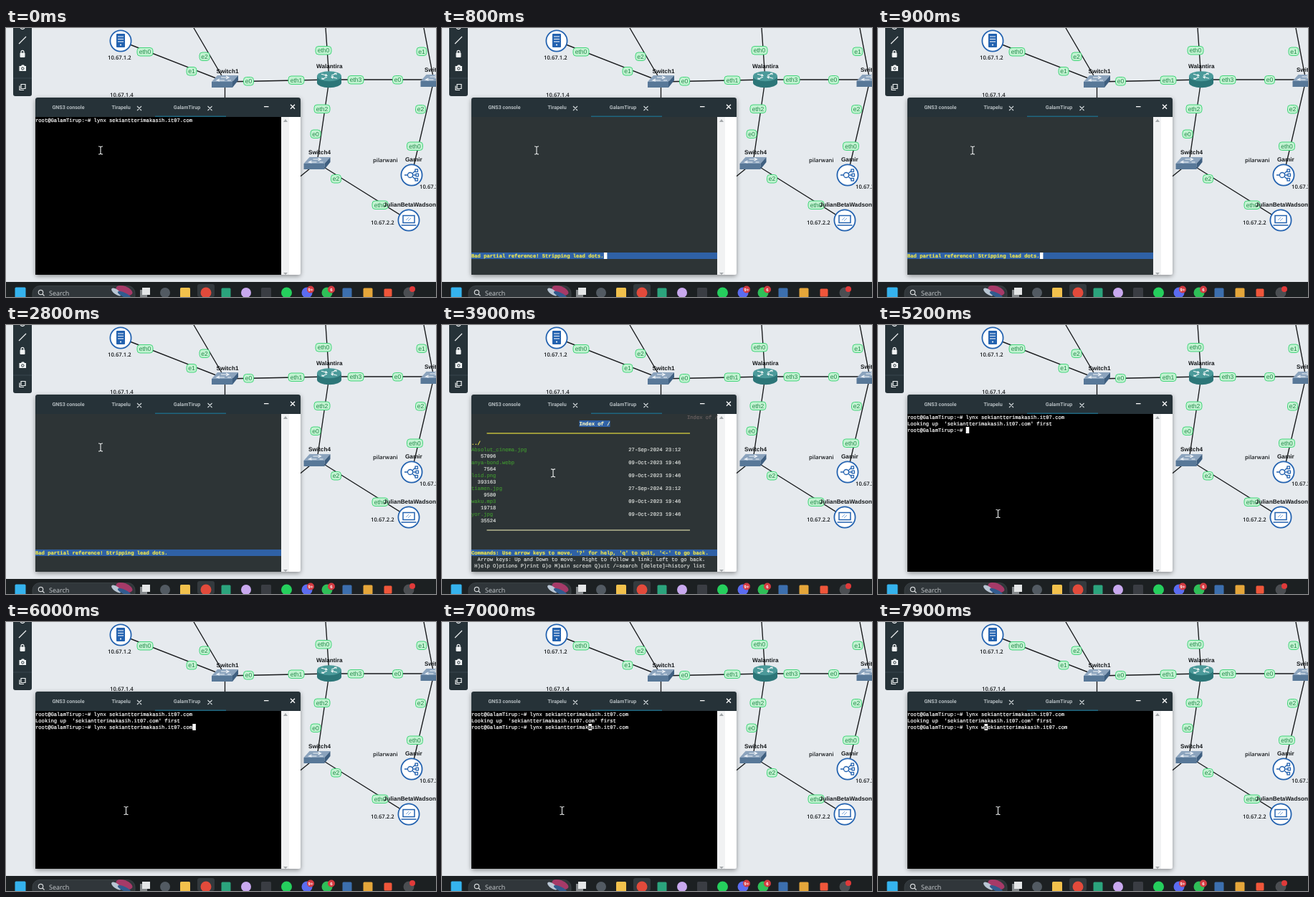
Write an HTML page that moves like this. It is 600 px wide and 375 px high and loops after 8 s.

```html
<!DOCTYPE html>
<html lang="en">
<head>
<meta charset="utf-8">
<title>Network console</title>
<style>
  html, body { margin: 0; width: 100%; height: 100%; overflow: hidden; background: #e6eaee; }
  svg { display: block; width: 600px; height: 375px; }
  text { text-rendering: geometricPrecision; white-space: pre; }
  .node { font: bold 8.2px "Liberation Sans", Arial, sans-serif; fill: #15181b; }
  .note { font: 600 7.7px "Open Sans", "Noto Sans", sans-serif; fill: #15181b; }
  .port { font: 8.6px "Liberation Sans", Arial, sans-serif; fill: #258a4c; text-anchor: middle; }
  .tab { font: 700 7.1px Roboto, sans-serif; fill: #b4bcc0; text-anchor: middle; }
  .ui { font: 9px "Open Sans", "Noto Sans", sans-serif; fill: #c9cdd0; }
  .badge { font: bold 6px "Liberation Sans", sans-serif; fill: #fff; text-anchor: middle; }
  #term text { font: 7.167px "Liberation Mono", "Courier New", monospace; stroke-width: .2px; }
  #term .b { font-weight: bold; }
</style>
</head>
<body>
<svg viewBox="0 0 600 375">
  <defs>
    <filter id="shadow" x="-10%" y="-10%" width="120%" height="125%">
      <feDropShadow dx="0" dy="2" stdDeviation="3" flood-opacity=".4"/>
    </filter>
    <g id="switch">
      <path d="M-18 0L-10-9H19L11 0Z" fill="#8ba3bd"/>
      <path d="M-18 0H11V8H-18Z" fill="#587898"/>
      <path d="M11 0L19-9V-2L11 8Z" fill="#3f5f80"/>
      <path d="M-5-6H5M2-8L6-6L2-4M-10-2H0M-7-4L-11-2L-7-1M4-2H9" fill="none" stroke="#eef3f8" stroke-width="1.1"/>
    </g>
    <g id="router">
      <path d="M-17-5V4A17 7 0 0 0 17 4V-5Z" fill="#2c7678"/>
      <ellipse cy="-5" rx="17" ry="7" fill="#4b9a9a"/>
      <path d="M-11-8L-3-6M-6-5L-3-6L-5-8M11-2L3-4M6-5L3-4L5-2M3-6L10-9M7-9H10V-7M-3-4L-10-1M-7-1H-10V-3" fill="none" stroke="#f1f8f8" stroke-width="1.1"/>
    </g>
    <circle id="disc" r="14.6" fill="#fff" stroke="#2463b0" stroke-width="1.8"/>
  </defs>

  <rect width="600" height="375" fill="#e6eaee"/>
  <path stroke="#17191b" stroke-width="1.35" fill="none" d="M160 18L306 75M262 0L306 75M305.500 75V100M306 75L451 72M446 0L451 72L597 72M451 72L434 188L562 268M434 188L400 215.500M583 0L597 73L566 205"/>
  <use href="#switch" x="305" y="75"/>
  <use href="#switch" x="433.500" y="189"/>
  <use href="#switch" x="596.500" y="74"/>
  <use href="#router" x="451" y="72.300"/>

  <use href="#disc" x="160" y="18"/>
  <rect x="154" y="8" width="12" height="19" rx="1" fill="#2463b0"/>
  <path d="M156 12H164M156 15.500H164M156 19H164" stroke="#fff" stroke-width="1.1"/>
  <circle cx="160" cy="23.500" r="1.100" fill="#fff"/>

  <use href="#disc" x="566" y="205"/>
  <g fill="#fff" stroke="#2463b0" stroke-width="1.3">
    <path d="M556 205H572M571 199L565 205L571 211" fill="none"/>
    <circle cx="564" cy="205" r="3.500"/>
    <rect x="571" y="197" width="3.500" height="3.500"/>
    <rect x="572" y="203.200" width="3.500" height="3.500"/>
    <rect x="571" y="209.500" width="3.500" height="3.500"/>
  </g>
  <use href="#disc" x="562" y="268"/>
  <path d="M554 261.500H570V271.500H554ZM551.500 275H572.500" fill="#fff" stroke="#2463b0" stroke-width="1.5"/>
  <path d="M558 268L562 264M561 269L565 265" stroke="#7fa8da"/>
  <g id="ports"></g>
  <g id="labels"></g>

  <path d="M10 0H36V92Q36 95 33 95H13Q10 95 10 92Z" fill="#263238"/>
  <g fill="none" stroke="#f0f3f4" stroke-width="1.2">
    <path d="M20 0Q23 3 26 0M18 22L28 12M21 35V33.500A2 2.200 0 0 1 25 33.500V35"/>
    <path d="M10 70H36" stroke="#36444b"/>
    <path d="M21 78.500H27V84.500H21ZM19 80.500V86.500H25"/>
  </g>
  <rect x="19.500" y="34.500" width="7" height="6.500" rx="1" fill="#f0f3f4"/>
  <path d="M18.500 53H21L22 51.500H25L26 53H28V60H18.500Z" fill="#f0f3f4"/>
  <circle cx="23.300" cy="56.500" r="1.700" fill="#f0f3f4" stroke="#263238"/>

  <rect x="41" y="97" width="370" height="247" rx="3" fill="#fff" filter="url(#shadow)"/>
  <path d="M41 124V100Q41 97 44 97H408Q411 97 411 100V124Z" fill="#263238"/>
  <rect x="208" y="122.500" width="99" height="1.500" fill="#1f6680"/>
  <text class="tab" x="87" y="112.500">GNS3 console</text>
  <text class="tab" x="160.500" y="112.500">Tirapelu</text>
  <text class="tab" x="252.500" y="112.500">GalamTirup</text>
  <g stroke="#d3d9dc" stroke-width="1.1">
    <path d="M183 109L189 115M189 109L183 115M281.500 109L287.500 115M287.500 109L281.500 115"/>
    <path d="M360 109.700H366.500M397 106.700L403 112.700M403 106.700L397 112.700" stroke="#fff" stroke-width="1.3"/>
  </g>
  <rect x="384" y="124" width="11" height="220" fill="#f1f2f3"/>
  <path d="M387 131L390 127L393 131ZM387 341L390 344L393 341Z" fill="#a3a7aa"/>
  <g id="term"></g>
  <path id="mouse" d="M-3-5.500Q0-5.500 0-4Q0-5.500 3-5.500M0-4V4M-3 5.500Q0 5.500 0 4Q0 5.500 3 5.500" fill="none" stroke="#eceeee" stroke-width="1.1"/>

  <rect y="354" width="600" height="21" fill="#1c2022"/>
  <rect x="37" y="359.500" width="143" height="24" rx="10" fill="#30363a" stroke="#41474b" stroke-width=".8"/>
  <circle cx="48.500" cy="368.500" r="3.200" fill="none" stroke="#d5d8da" stroke-width="1.2"/>
  <path d="M51 371L53.500 373.500" stroke="#d5d8da" stroke-width="1.2"/>
  <text class="ui" x="60" y="373">Search</text>
  <ellipse cx="165" cy="366" rx="12" ry="6" fill="#a63a68" transform="rotate(20 165 366)"/>
  <ellipse cx="154" cy="368" rx="8" ry="3.500" fill="#b9c6d4" transform="rotate(35 154 368)"/>
  <ellipse cx="165" cy="372" rx="10" ry="3" fill="#315b8e" transform="rotate(25 165 372)"/>
  <g id="icons"></g>
</svg>
<script>
const el = id => document.getElementById(id);

// Diagram labels
const ports = [
  ["eth0", 194, 33], ["e1", 259, 60], ["e2", 277, 39.5], ["e0", 338.5, 74], ["eth1", 405, 72.5],
  ["eth3", 488, 72], ["e0", 546.5, 72], ["eth0", 443, 31], ["eth2", 441, 112.5], ["e0", 432, 147.5],
  ["e1", 580, 32.5], ["e2", 578.5, 113], ["eth0", 570.5, 164.5], ["e2", 460.5, 210], ["eth0", 522, 246.5]];
el("ports").innerHTML = ports.map(([s, x, y]) => {
  const w = s.length > 2 ? 22 : 14;
  return `<rect x="${x - w / 2}" y="${y - 5.5}" width="${w}" height="11.500" rx="4" fill="#c3f3d2" stroke="#45d57c"/>
    <text class="port" x="${x}" y="${y + 3.2}">${s}</text>`;
}).join("");

const labels = [
  ["node", "Switch1", 293.5, 62.7], ["node", "Walantira", 433, 56.3], ["node", "Switch4", 422, 176.3],
  ["node", "Switch3", 584, 61], ["node", "Gamir", 557, 185.5], ["node", "JulianBetaWadson", 527, 249],
  ["note", "10.67.1.2", 142, 44], ["note", "10.67.1.4", 145, 95.5], ["note", "10.67.2.2", 509, 273.5],
  ["note", "10.67.3.2", 577, 224], ["note", "pilarwani", 512, 187]];
el("labels").innerHTML = labels.map(([c, s, x, y]) => `<text class="${c}" x="${x}" y="${y}">${s}</text>`).join("");

// Taskbar icons
const box = (x, w, fill) => `<rect x="${x - w / 2}" y="${369 - w / 2}" width="${w}" height="${w}" rx="1.500" fill="${fill}"/>`;
const dot = (x, r, fill, y = 369) => `<circle cx="${x}" cy="${y}" r="${r}" fill="${fill}"/>`;
const badge = (x, s) => dot(x, 5, "#d43b42", 364.5) + `<text class="badge" x="${x}" y="366.600">${s}</text>`;
el("icons").innerHTML =
  box(20, 15, "#35b3ee") +
  `<rect x="187" y="365" width="10" height="10" fill="#85898c"/><rect x="190" y="362" width="11" height="10" fill="#e4e6e7"/>` +
  dot(222, 7, "#525a62") + box(250, 14, "#f2c14c") +
  `<rect x="267" y="357" width="24" height="18" rx="3" fill="#343a3e"/>` + dot(279, 7.5, "#e24a3b") +
  box(307, 13, "#2ba47d") + dot(335, 7, "#c9a9ef") + box(363, 14, "#3a3d43") +
  dot(391.5, 7.5, "#25cf5d") + dot(420, 7.5, "#5b6cf0") + badge(425, "9+") +
  dot(448, 7.5, "#2fbf58") + badge(454, "6") + box(476, 13, "#3c6fae") +
  box(505, 13, "#e5a63a") + box(533, 11, "#f0563a") + dot(562, 7.5, "#4b4e52") + dot(567, 4, "#e03a3a", 364);

// Terminal on an 80 x 24 character grid
const CW = 4.3, RH = 9, LEFT = 41, TOP = 124;
const colX = c => LEFT + c * CW, rowY = r => TOP + r * RH;
const put = (row, col, s, fill = "#fff", cls = "") =>
  `<text class="${cls}" x="${colX(col)}" y="${rowY(row) + 7}" fill="${fill}" stroke="${fill}">${s.replace(/</g, "&lt;")}</text>`;
const fillRow = (row, col, n, fill) =>
  `<rect x="${colX(col)}" y="${rowY(row)}" width="${n * CW}" height="${RH}" fill="${fill}"/>`;
const cursor = (row, col, ch = "") =>
  fillRow(row, col, 1.05, "#fff") + (ch && put(row, col, ch, "#000"));
const ground = fill => `<rect x="41" y="124" width="343" height="220" fill="${fill}"/>`;
const blinkOn = (t, since) => (t - since) % 1200 < 600;

const HOST = "sekiantterimakasih.it07.com", PROMPT = "root@GalamTirup:~# ";
const LOOKUP = `Looking up  '${HOST}' first`;
const YELLOW = "#f3e84a", BLUE = "#2f61a6", SLATE = "#2d3436", GREEN = "#3f8f31", PALE = "#d9dcd9";

const files = [
  ["Absolut_cinema.jpg", 57096, 1], ["anya-bond.webp", 7564, 0], ["loid.png", 393163, 0],
  ["tiamen.jpg", 9580, 1], ["waku.mp3", 19718, 0], ["yor.jpg", 35524, 0]];

const rule = (row, fill) => `<rect x="62.500" y="${rowY(row) + 8.400}" width="283.500" height="1.200" fill="${fill}"/>`;
const status = s => `<rect x="41" y="313" width="343" height="9" fill="${BLUE}"/>` + put(21, 0, s, YELLOW, "b");

function indexPage(message) {
  return ground(SLATE) + put(0, 70, "Index of /", "#6b6262") +
    fillRow(1, 35, 10, BLUE) + put(1, 35, "Index of /", "#f6f3c0", "b") +
    rule(2, "#e3d93f") + put(4, 0, "../", YELLOW, "b") +
    files.map(([name, size, recent], i) => {
      const row = 5 + 2 * i;
      return put(row, 0, name, GREEN) +
        put(row, 51, recent ? "27-Sep-2024 23:12" : "09-Oct-2023 19:46", PALE) +
        put(row + 1, 8 - String(size).length, String(size), PALE);
    }).join("") +
    rule(17, "#d8d8a8") + status(message) +
    put(22, 2, "Arrow keys: Up and Down to move.  Right to follow a link; Left to go back.", PALE) +
    put(23, 1, "H)elp O)ptions P)rint G)o M)ain screen Q)uit /=search [delete]=history list", PALE);
}

function shell(t) {
  const first = ground("#000") + put(0, 0, PROMPT + "lynx " + HOST);
  if (t < 200) return first;
  const looked = first + put(1, 0, LOOKUP);
  if (t < 500) return looked;
  let line = PROMPT, col = line.length, since = 5200;
  if (t >= 5900) {
    line += "lynx " + (t >= 7800 ? "w" : "") + HOST;
    // Left arrow: one step, then key repeat back to the host name
    const steps = Math.max(0, Math.floor((t - 6640) / 30));
    col = t < 6300 ? 51 : t >= 7800 ? 25 : Math.max(24, 50 - steps);
    since = t < 6300 ? 5900 : t < 6640 ? 6300 : t >= 7800 ? 7800 : t >= 7420 ? 7420 : t;
  }
  return looked + put(2, 0, line) + (blinkOn(t, since) ? cursor(2, col, line[col]) : "");
}

function screen(t) {
  if (t < 500 || t >= 5200) return shell(t);
  if (t < 3000) {
    const msg = "Bad partial reference! Stripping lead dots.";
    return ground(SLATE) + status(msg) + (blinkOn(t, 500) ? cursor(21, msg.length) : "");
  }
  if (t < 4700) return indexPage("Commands: Use arrow keys to move, '?' for help, 'q' to quit, '<-' to go back.");
  return indexPage("Are you sure you want to quit? (y) ") + (blinkOn(t, 4700) ? cursor(21, 35) : "");
}

const ease = (t, a, b) => {
  const k = Math.min(1, Math.max(0, (t - a) / (b - a)));
  return k * k * (3 - 2 * k);
};

let shown = "";
function frame(now) {
  const t = now % 8000;
  const html = screen(t);
  if (html !== shown) el("term").innerHTML = shown = html;
  const out = ease(t, 3750, 4150), back = ease(t, 4200, 4500);
  el("mouse").setAttribute("transform", `translate(${132 + 72 * out - 36.5 * back} ${170.5 + 112 * out - 19.5 * back})`);
  requestAnimationFrame(frame);
}
frame(0);
</script>
</body>
</html>
```
